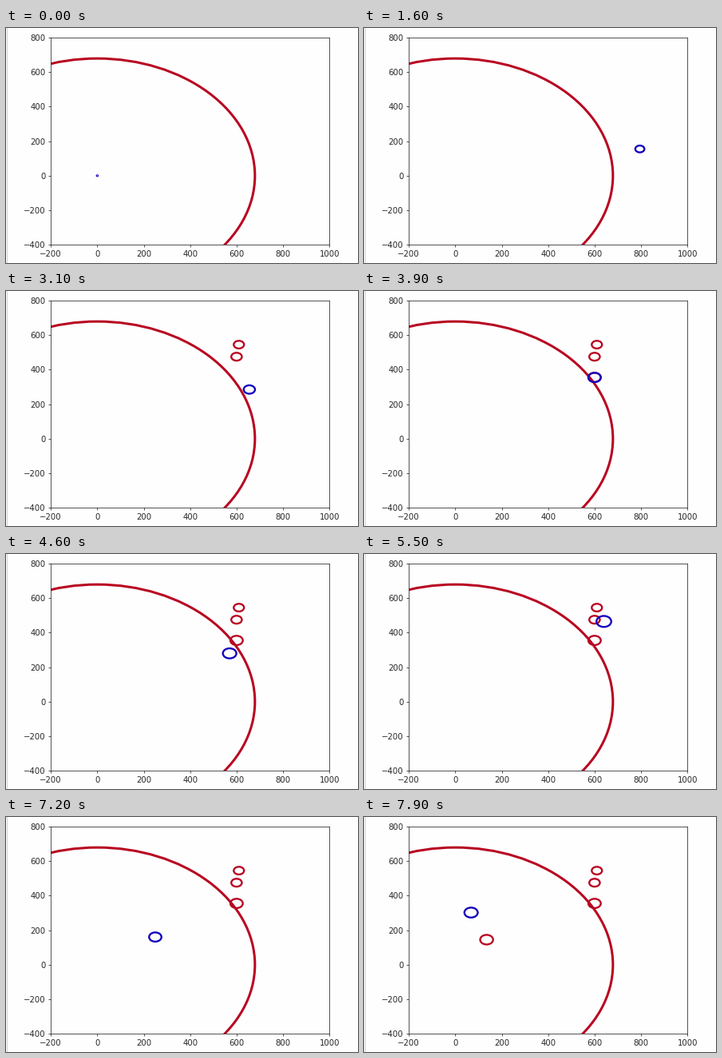
Animation, 441 px wide and 294 px high, one loop 8000 ms. Source, as a matplotlib script:

```python
import numpy as np
import matplotlib.pyplot as plt
from matplotlib.animation import FuncAnimation
from matplotlib.lines import Line2D
from matplotlib.patches import Circle

W, H, DPI = 441, 294, 70
FRAMES, STEP = 80, 100
RED, BLUE, INK, PAPER = "#b80420", "#1200bc", "#262626", "#fefefe"
LEFT, RIGHT, TOP, BOTTOM = 56.2, 405.2, 12, 271.2

# Turning points of the moving circle, by step
PATH = {
    0: (0, 0), 13: (818, 95), 16: (795, 155), 22: (680, 672),
    24: (610, 545), 26: (600, 475), 31: (655, 285), 39: (600, 355),
    46: (570, 280), 55: (640, 465), 59: (725, 730), 65: (503, 395),
    76: (135, 145), 79: (68, 302),
}
MARKED = (24, 26, 39, 76)
RESET = 60

times = np.array(list(PATH))
points = np.array(list(PATH.values()), float)
slopes = 0.6 * np.gradient(points, times, axis=0)


def position(t):
    """Smooth Hermite path through the turning points."""
    i = min(np.searchsorted(times, t, side="right") - 1, len(times) - 2)
    span = times[i + 1] - times[i]
    u = (t - times[i]) / span
    ease = u * u * (3 - 2 * u)
    return (points[i] + ease * (points[i + 1] - points[i])
            + span * u * (1 - u) * ((1 - u) * slopes[i] - u * slopes[i + 1]))


def radius(t):
    """Quick start, then steady growth with one drop."""
    return min(2 + 1.5 * t, 14.8 + 0.31 * t - 10.5 * (t >= RESET))


def ring(center, r, color, lw=2.4, z=3):
    return ax.add_patch(Circle(center, r, fill=False, ec=color, lw=lw, zorder=z))


fig = plt.figure(figsize=(W / DPI, H / DPI), dpi=DPI, facecolor=PAPER)
ax = fig.add_axes([LEFT / W, 1 - BOTTOM / H, (RIGHT - LEFT) / W,
                   (BOTTOM - TOP) / H], facecolor=PAPER)
ax.set(xlim=(-200, 1000), ylim=(-400, 800))
ax.tick_params(labelsize=10.4, color=INK, labelcolor=INK)
ax.spines[:].set_color(INK)
fig.add_artist(Line2D([0.5 / W] * 2, [0, 1], color="#d2d2d2", lw=1))

ring((0, 0), 679, RED, lw=3.1, z=2)
marks = [(t, ring(position(t), radius(t), RED)) for t in MARKED]
mover = ring((0, 0), radius(0), BLUE, z=4)


def draw(n):
    mover.center = position(n)
    mover.set_radius(radius(n))
    for t, mark in marks:
        mark.set_visible(n >= t)
    return [mover] + [mark for _, mark in marks]


anim = FuncAnimation(fig, draw, frames=FRAMES, interval=STEP,
                     repeat=True, repeat_delay=0)
plt.show()
```
